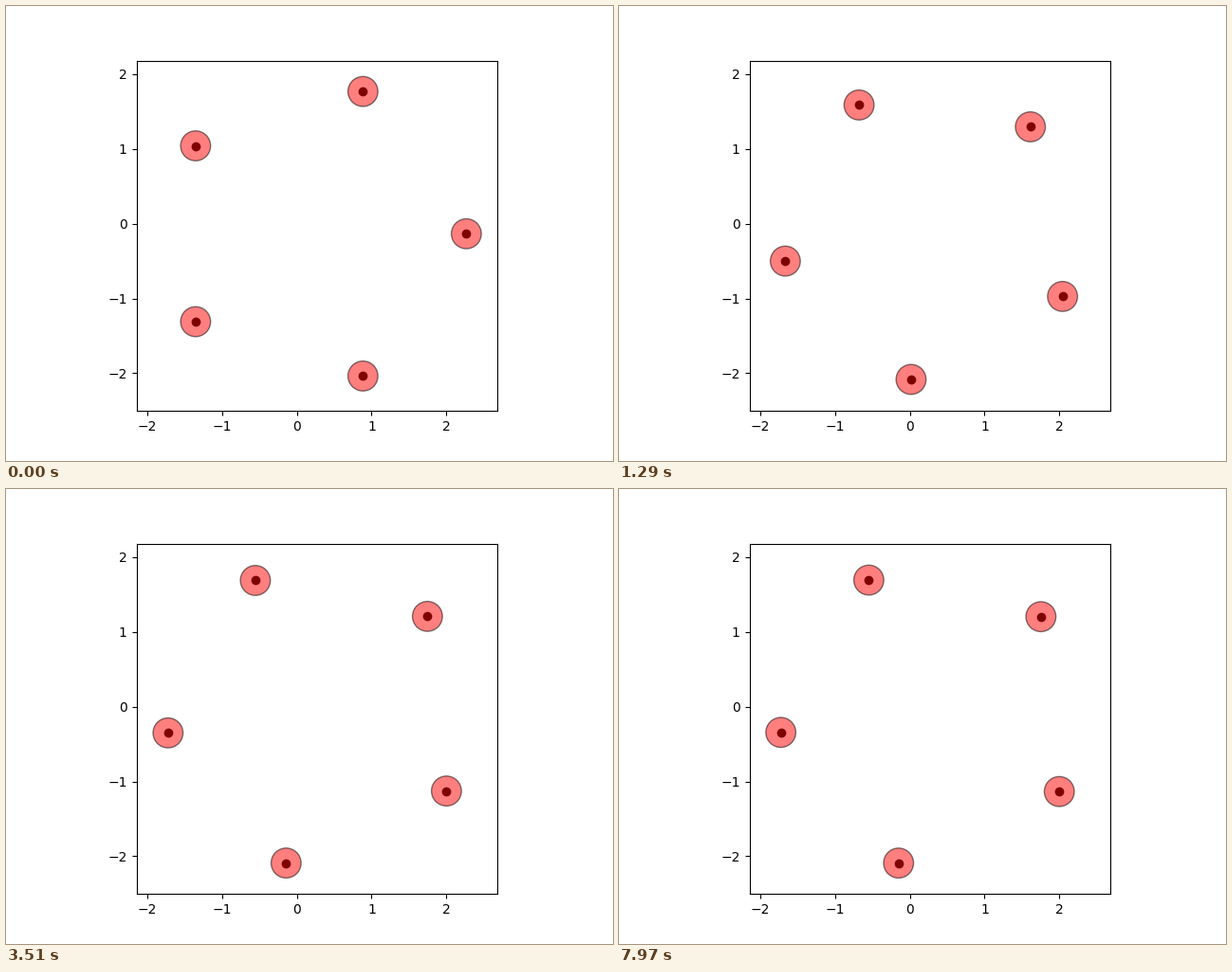
Recreate the animation shown at these times as a matplotlib script. Size 640 by 480 pixels, loop 8 s.

```python
import numpy as np
import matplotlib.pyplot as plt
from matplotlib.animation import FuncAnimation

LOOP_MS = 8000
FRAME_MS = 20
STEP_MS = 30

N = 5
RADIUS = 2.0
BODY = 0.2
CENTER = np.array([0.266, -0.135])
TURN = np.radians(-30)

# Ring consensus: the first harmonic decays with this Laplacian eigenvalue.
RATE = 2 - 2 * np.cos(2 * np.pi / N)
DECAY = 1 - RATE * STEP_MS / 1000


def pentagon(turn):
    a = 2 * np.pi * np.arange(N) / N + turn
    return CENTER + RADIUS * np.column_stack([np.cos(a), np.sin(a)])


start, goal = pentagon(0), pentagon(TURN)


def positions(step):
    return goal + (start - goal) * DECAY ** step


def padded(values):
    lo, hi = values.min() - BODY, values.max() + BODY
    pad = 0.05 * (hi - lo)
    return lo - pad, hi + pad


fig, ax = plt.subplots(figsize=(6.4, 4.8), dpi=100)
ends = np.vstack([start, goal])
ax.set_aspect("equal")
ax.set_xlim(padded(ends[:, 0]))
ax.set_ylim(padded(ends[:, 1]))

# Black dots lie under the translucent bodies, which tint them maroon.
dots, = ax.plot(*start.T, "ko", zorder=0.5)
bodies = [ax.add_patch(plt.Circle(p, BODY, fc="r", ec="k", alpha=0.5))
          for p in start]


def update(i):
    step = (i * FRAME_MS + FRAME_MS // 2) // STEP_MS
    pos = positions(step)
    dots.set_data(*pos.T)
    for body, p in zip(bodies, pos):
        body.center = p
    return [dots, *bodies]


anim = FuncAnimation(fig, update, frames=LOOP_MS // FRAME_MS,
                     interval=FRAME_MS, repeat=True, repeat_delay=0)
plt.show()
```
